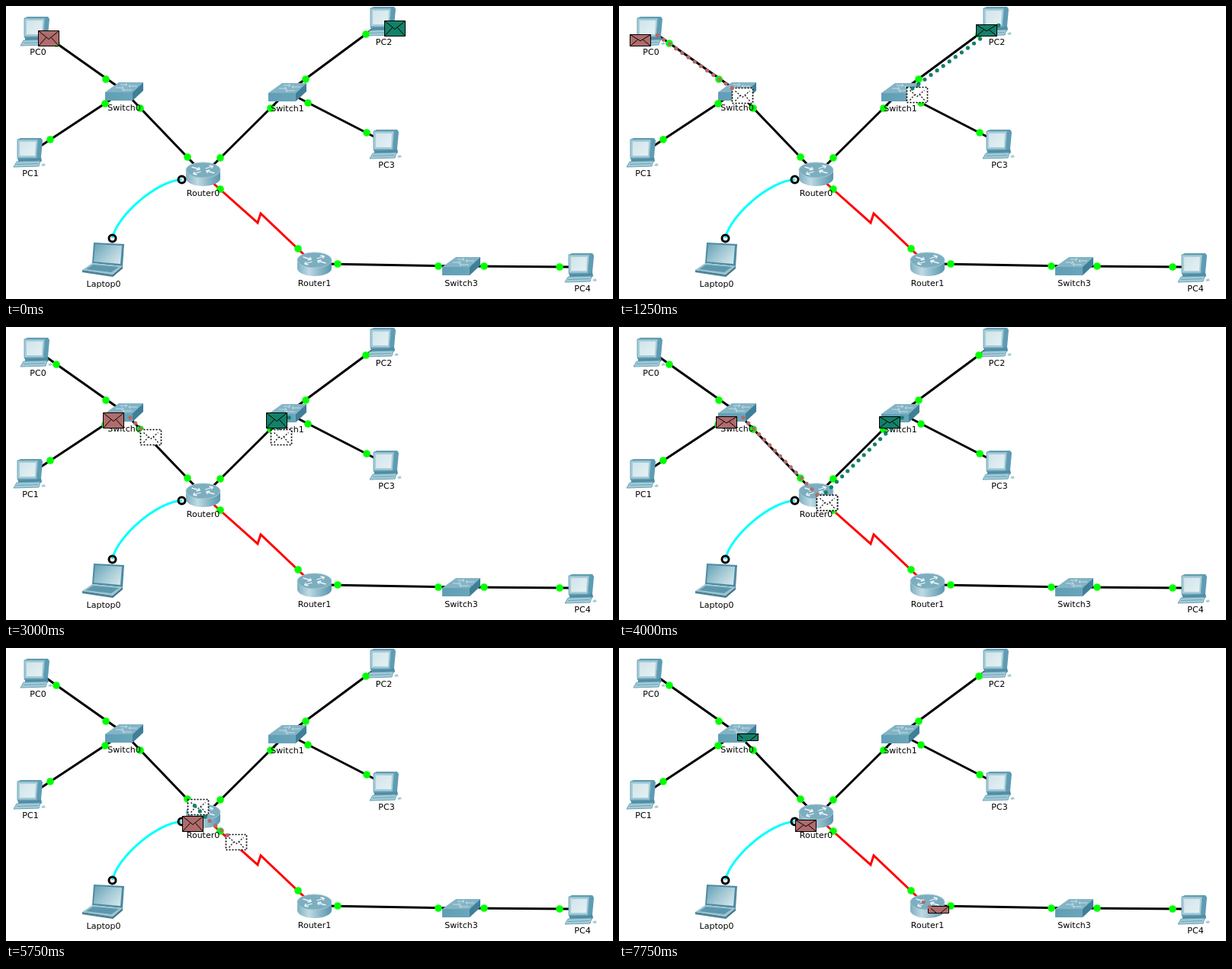
An HTML page with a canvas for the animation above (8000 ms loop, 796 px wide and 384 px high).

```html
<!DOCTYPE html>
<html lang="en">
<head>
<meta charset="utf-8">
<title>Packet flow</title>
<style>
  html, body { margin: 0; width: 100%; height: 100%; overflow: hidden; background: #fff; }
  canvas { display: block; }
</style>
</head>
<body>
<canvas id="stage" width="796" height="384"></canvas>
<script>
const ctx = document.getElementById('stage').getContext('2d');
const STEP = 250, STEPS = 32, HOP_STEPS = 11;
const ENV_W = 27, ENV_H = 20;
const BROWN = '#b06c6c', TEAL = '#138069';

function stroke(path, color, width = 1) {
  ctx.strokeStyle = color;
  ctx.lineWidth = width;
  ctx.stroke(new Path2D(path));
}

function fill(path, color, edge) {
  ctx.fillStyle = color;
  ctx.fill(new Path2D(path));
  if (edge) stroke(path, edge);
}

function at(x, y, draw) {
  ctx.save();
  ctx.translate(x, y);
  draw();
  ctx.restore();
}

function gradient(x0, y0, x1, y1, ...colors) {
  const g = ctx.createLinearGradient(x0, y0, x1, y1);
  colors.forEach((c, i) => g.addColorStop(i / (colors.length - 1), c));
  return g;
}

function circle(x, y, r) {
  ctx.beginPath();
  ctx.arc(x, y, r, 0, 2 * Math.PI);
}

function pc() {
  fill('M5 3L9 1H36L38 4 36 26 31 30 5 29Z', '#5e9cb3');
  fill('M5 3H32L30 27H5Z', '#a9ccd8', '#6aa4b8');
  fill('M8 6H29L28 24H8Z', gradient(8, 5, 28, 25, '#cfe4ea', '#e6f1f3'));
  fill('M6 29L31 28 36 26 37 31 32 35H6Z', '#4e8ca4');
  fill('M4 32L35 31 33 38 0 39Z', '#a5cbd7', '#6aa4b8');
  stroke('M4 35.5L32 34.5', '#6aa4b8');
  fill('M36 36L40 34 42 37 38 38Z', '#a5cbd7');
}

function networkSwitch() {
  fill('M0 13L18 0H50L36 13Z', '#83b4c5');
  fill('M0 13H36V24H0Z', gradient(0, 13, 36, 24, '#5f9eb5', '#6ba6ba'));
  fill('M36 13L50 0V11L36 24Z', '#3f7f98');
  stroke('M20 3H29L27 1M29 3L26 5M42 5H31L33 3M31 5L33 7M14 7H24L22 5M24 7L21 9M35 10H23L25 8M23 10L25 12', '#c5dde5');
}

function router() {
  fill('M-22.5 0V11A22.5 10 0 0 0 22.5 11V0Z', gradient(-22, 0, 22, 0, '#7fb0c2', '#bfdae3', '#8ab7c7', '#5b97ae'));
  fill('M-22.5 0A22.5 10 0 0 1 22.5 0A22.5 10 0 0 1 -22.5 0Z', '#7caec0', '#a3c8d4');
  stroke('M-15 -4L-4 -1M-4 -1L-6 -4M-4 -1L-9 0M15 4L4 1M4 1L9 0M4 1L6 4M3 -2L13 -5M13 -5L8 -6M13 -5L11 -2M-3 2L-13 5M-13 5L-11 2M-13 5L-8 6', '#edf6f7', 1.3);
}

function laptop() {
  fill('M15 0L55 2 53 31 13 27Z', '#4d8ba2');
  fill('M17 2L52 4 50 28 15 25Z', gradient(18, 3, 46, 30, '#6ea6b9', '#a3c9d5', '#d3e6eb'));
  fill('M13 27L53 31 40 42 0 36Z', '#9cc4d0');
  fill('M0 36L40 42V45L0 39Z', '#4c849a');
  fill('M40 42L53 31V34L40 45Z', '#417389');
  fill('M14 29L48 32 38 39 5 35Z', '#5d97ad');
}

const devices = [
  [pc, [[19, 13], [10, 172], [473, 0], [477, 161], [733, 323]]],
  [networkSwitch, [[130, 100], [344, 101], [572, 329]]],
  [router, [[258.5, 215], [404.5, 333]]],
  [laptop, [[100, 310]]]
];

const labels = [
  ['PC0', 42, 64], ['PC1', 32, 223], ['PC2', 495.5, 51], ['PC3', 499, 212], ['PC4', 756, 374],
  ['Switch0', 155, 137], ['Switch1', 369, 138], ['Switch3', 597, 367],
  ['Router0', 258.5, 249], ['Router1', 404.5, 367], ['Laptop0', 128, 368]
];

const cables = 'M48 36L150 108M40 187L140 121M160 117L255 216M365 116L266 214' +
  'M484 28L380 105M375 116L490 175M420 338L590 341M610 341L740 342';

const lights = [
  [66, 49], [131, 96], [58, 175], [130, 128], [176, 134], [238, 198], [347, 134], [281, 199],
  [472, 37], [393, 96], [396, 127], [473, 166], [281, 240], [383, 318],
  [435, 338], [567, 341], [627, 341], [726, 342]
];

function drawNetwork() {
  ctx.fillStyle = '#fff';
  ctx.fillRect(0, 0, 796, 384);
  stroke(cables, '#000', 3);
  stroke('M268 229L330 284 334 272 391 326', '#f00', 3);
  stroke('M230.5 227.5C198 229 146 274 139.5 304', '#0ff', 3);
  for (const [draw, places] of devices) for (const [x, y] of places) at(x, y, draw);
  ctx.fillStyle = '#0f0';
  for (const [x, y] of lights) {
    circle(x, y, 4.8);
    ctx.fill();
  }
  ctx.lineWidth = 3;
  ctx.strokeStyle = '#000';
  for (const [x, y] of [[230.5, 227.5], [139.5, 304.5]]) {
    circle(x, y, 4.5);
    ctx.stroke();
  }
  ctx.font = '11px "DejaVu Sans", sans-serif';
  ctx.textAlign = 'center';
  ctx.fillStyle = '#000';
  for (const label of labels) ctx.fillText(...label);
}

function envelope(x, y, color, height = ENV_H) {
  const flap = height * .55, fold = height * .45;
  at(x + .5, y + .5, () => {
    fill(`M0 0H${ENV_W}V${height}H0Z`, color, '#000');
    stroke(`M0 0L13.5 ${flap} 27 0M0 ${height}L10 ${fold}M27 ${height}L17 ${fold}`, '#000');
  });
}

// An arriving envelope is uncovered from its top edge down.
function arrivingEnvelope(x, y, color, height) {
  ctx.save();
  ctx.beginPath();
  ctx.rect(x, y, ENV_W + 1, height);
  ctx.clip();
  envelope(x, y, color);
  ctx.restore();
  at(x + .5, y + .5, () => stroke(`M0 0H${ENV_W}V${Math.floor(height)}H0Z`, '#000'));
}

function ghost(x, y) {
  at(x + .5, y + .5, () => {
    ctx.setLineDash([2, 2]);
    fill(`M0 0H${ENV_W}V${ENV_H}H0Z`, '#fff');
    stroke(`M0 0H${ENV_W}V${ENV_H}H0Z`, '#000', 1.7);
    stroke('M4 4L13.5 12 23 4M4 17L10 10M23 17L17 10', '#000', 1.2);
  });
}

const PC0 = [42, 32], PC2 = [496, 19], SW0 = [155, 112], SW1 = [369, 112], RT0 = [259, 220], RT1 = [405, 338];
const routes = [
  { color: TEAL, stops: [PC2, SW1, RT0, SW0] },
  { color: BROWN, stops: [PC0, SW0, RT0, RT1] }
];

function drawPacket({ color, stops }, hop, k) {
  const [x0, y0] = stops[hop], [x1, y1] = stops[hop + 1];
  if (k === 0) return envelope(x0, y0, color);

  const point = p => [x0 + (x1 - x0) * p, y0 + (y1 - y0) * p];
  const reach = hop === 0 ? .94 : 1;
  const head = reach * Math.min(1, k / 5);
  const tail = Math.max(0, (k - 5) * .23);
  const [hx, hy] = point(head).map(Math.round);

  if (k <= 5) ghost(hx, hy);
  else arrivingEnvelope(hx, hy, color, (k - 5) * 2.25);

  const length = Math.hypot(x1 - x0, y1 - y0);
  ctx.fillStyle = color;
  for (let d = 4; d <= head * length; d += 10) {
    if (d < tail * length) continue;
    const [x, y] = point(d / length);
    circle(x + 5, y + 4, 2.6);
    ctx.fill();
  }

  const lost = Math.round(Math.min(4, k - 1) * 1.25);
  envelope(x0 - 28, y0 + lost, color, ENV_H - lost);
}

function frame(now) {
  const step = Math.floor(now / STEP) % STEPS;
  const hop = Math.floor(step / HOP_STEPS);
  drawNetwork();
  for (const route of routes) drawPacket(route, hop, step % HOP_STEPS);
  requestAnimationFrame(frame);
}

frame(0);
</script>
</body>
</html>
```
